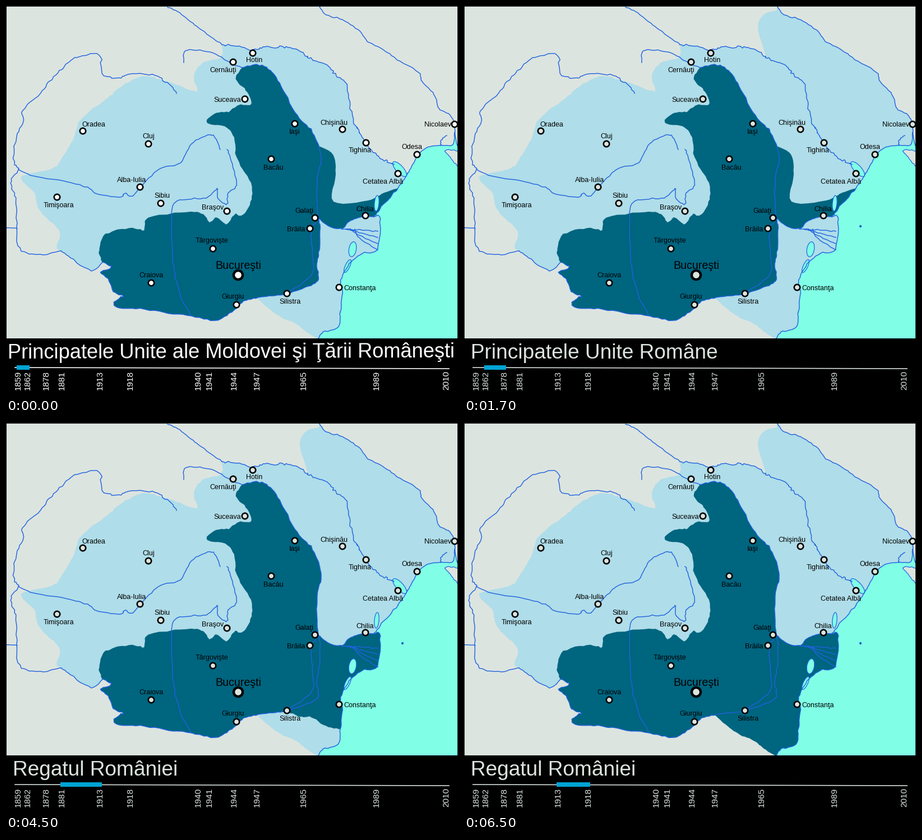
A matplotlib script that plays this animation: 806x694 px, repeating every 8 s.

```python
import numpy as np
import matplotlib.pyplot as plt
from matplotlib.animation import FuncAnimation
from matplotlib.patches import Circle, Ellipse, Polygon, Rectangle

W, H, DPI = 806, 694, 100
MAP_H = 594
PX = 72 / DPI
LAND, LIGHT, DARK = "#dce4df", "#afdde9", "#00657f"
SEA, RIVER, ACCENT = "#80ffe6", "#1f62df", "#00a3d3"

plt.rcParams["font.family"] = "Liberation Sans"
rng = np.random.default_rng(7)


def curve(*points, wobble=0.6, steps=6):
    """Catmull-Rom spline through the points with a small seeded meander."""
    p = np.array([points[0], *points, points[-1]], float)
    t = np.arange(steps)[:, None] / steps
    parts = [b + t / 2 * (c - a + t * (2 * a - 5 * b + 4 * c - d
                                       + t * (3 * (b - c) + d - a)))
             for a, b, c, d in zip(p, p[1:], p[2:], p[3:])]
    line = np.vstack([*parts, p[-1:]])
    line[1:-1] += rng.normal(0, wobble, line[1:-1].shape)
    return line


def back(line):
    return line[::-1]


# Rivers
dniester_up = curve((288, 2), (306, 10), (330, 28), (353, 46), (385, 69))
dniester_mid = curve((385, 69), (410, 71), (440, 79), (459, 73), (480, 74),
                     (500, 73), (520, 79), (538, 90), wobble=1)
dniester_low = curve((538, 90), (552, 99), (575, 107), (586, 122), (605, 136),
                     (612, 170), (620, 205), (630, 225), (641, 243),
                     (657, 264), (678, 277), (692, 283), wobble=1.2)
bug = curve((558, 0), (572, 16), (600, 25), (628, 42), (645, 63), (672, 77),
            (697, 95), (735, 118), (742, 135), (764, 158), (772, 183),
            (791, 194), (800, 211), (800, 225))
tisa = curve((304, 156), (284, 135), (262, 123), (218, 122), (200, 130),
             (172, 121), (165, 87), (121, 95), (96, 117), (77, 135),
             (62, 156), (30, 187), (31, 205), (18, 235), (14, 278), (22, 291),
             (10, 312), (17, 345), (19, 385), (24, 433), (60, 444), (98, 437),
             wobble=1.1)
mures = curve((22, 291), (50, 304), (100, 312), (145, 323), (160, 334),
              (200, 341), (213, 335), (225, 338), (255, 307), (275, 290),
              (311, 280), (328, 250), (350, 234), (370, 231), (382, 256))
olt = curve((394, 256), (404, 283), (411, 320), (396, 333), (394, 353),
            (378, 343), (376, 326), (357, 342), (325, 345), (297, 358),
            (297, 440), (299, 470), (311, 515), (330, 553))
prut_up = curve((317, 101), (318, 82), (340, 78), (375, 87), (400, 102), (421, 110))
prut_mid = curve((421, 110), (452, 105), (475, 119), (494, 150), (519, 196),
                 (543, 220), (558, 250))
prut_low = curve((558, 250), (562, 275), (556, 303), (554, 345), (557, 379))
chilia_arm = curve((557, 379), (578, 394), (600, 397), (612, 384), (632, 377),
                   (656, 376), wobble=0.4)
danube_east = curve((557, 379), (560, 395), (558, 440), (554, 460), (557, 488),
                    (540, 499), (501, 514))
danube_inner = curve((552, 386), (544, 400), (546, 440), (546, 478), (503, 511))
danube_mid = curve((501, 514), (475, 517), (447, 521), wobble=0.4)
danube_west = curve((447, 521), (424, 527), (403, 546), (372, 561), (330, 553),
                    (290, 548), (240, 540), (198, 538), (194, 527), (209, 517),
                    (194, 512), (182, 487), (169, 475), (187, 466), (172, 457))
banat_danube = curve((98, 437), (115, 449), (152, 472), (172, 457))
delta_arms = [curve((598 + 8 * k, 398), (630, 399 + 5 * k), (663, 402 + 11 * k))
              for k in range(4)]

# Coast, from the eastern edge to the southern one
gulf = curve((806, 251), (802, 240), (800, 225), (797, 247), (775, 249),
             (752, 252), (733, 266), wobble=0.3)
coast_north = curve((733, 266), (720, 293), (712, 306), (699, 325))
coast_mid = curve((699, 325), (670, 358), (656, 376))
coast_delta = curve((656, 376), (667, 379), (662, 435), (636, 441), (612, 460),
                    (597, 489), (600, 512), (596, 546))
coast_south = curve((596, 546), (592, 573), (565, 582), (556, MAP_H))
spit = curve((806, 259), (783, 257), (792, 270), (806, 286))

# Land borders
northwest = curve((385, 69), (382, 92), (350, 102), (335, 126), (340, 152),
                  (303, 140), (283, 133), (255, 126), (235, 128), (203, 145),
                  (182, 164), (150, 187), (130, 207), (120, 238), (97, 275),
                  (83, 290), (27, 305), (50, 333), (56, 357), (72, 378),
                  (95, 402), (91, 430), (98, 437))
carpathians = curve((172, 457), (166, 437), (178, 407), (220, 396), (246, 399),
                    (254, 378), (322, 367), (352, 372), (363, 386), (376, 377),
                    (393, 389), (407, 373), (422, 373), (436, 350), (437, 316),
                    (414, 278), (406, 235), (390, 215), (358, 209), (372, 192),
                    (397, 188), (415, 177), (437, 174), (428, 150), (410, 131),
                    (421, 110))
bessarabia_south = curve((558, 250), (583, 265), (588, 300), (584, 349),
                         (645, 347), (675, 333), (699, 325), wobble=0.2)
quadrilateral = curve((447, 521), (470, 541), (492, 556), (517, 567),
                      (535, 581), (556, MAP_H), wobble=0.3)
dobrogea_south = curve((596, 546), (570, 541), (545, 525), (524, 524), (501, 514))
east_bank = curve((558, 8), (538, 13), (526, 27), (525, 46), (533, 72), (538, 90),
                  wobble=0)

light_area = [northwest, banat_danube, back(danube_west), quadrilateral,
              back(coast_south), back(coast_delta), back(coast_mid),
              back(coast_north[8:]), back(dniester_low), back(dniester_mid)]
transnistria = [east_bank, dniester_low, back(coast_north), back(gulf), back(bug)]
heartland = [danube_west, carpathians, prut_mid]
with_delta = [*heartland, prut_low, chilia_arm, coast_delta]
dark_areas = [
    [*heartland, bessarabia_south, coast_mid, back(chilia_arm), danube_east, danube_mid],
    [*with_delta, dobrogea_south, danube_mid],
    [*with_delta, coast_south, back(quadrilateral)],
]
coast = [gulf, coast_north, coast_mid, coast_delta, coast_south]
rivers = [dniester_up, dniester_mid, dniester_low, bug, tisa, mures, olt,
          prut_up, prut_mid, prut_low, chilia_arm, danube_east, danube_inner,
          danube_mid, danube_west, banat_danube, *delta_arms, *coast,
          curve((0, 396), (20, 397)), curve((786, 231), (777, 238), (775, 249))]
# centre, width, height, angle
lagoons = [((702, 291), 34, 13, 48), ((661, 352), 8, 28, 5),
           ((618, 434), 13, 27, 10), ((609, 464), 8, 25, 25)]

# name, marker position, label offset
cities = [
    ("Hotin", 440, 84, 3, 12), ("Cernăuţi", 405, 100, -18, 14),
    ("Suceava", 426, 166, -31, 1), ("Oradea", 137, 223, 19, -12),
    ("Cluj", 254, 246, 0, -14), ("Iaşi", 515, 210, 0, 14),
    ("Chişinău", 600, 220, -15, -12), ("Tighina", 642, 244, -11, 13),
    ("Nicolaev", 800, 211, -30, 0), ("Odesa", 733, 265, -9, -14),
    ("Cetatea Albă", 699, 299, -27, 14), ("Bacău", 473, 273, 4, 15),
    ("Alba-Iulia", 239, 323, -15, -13), ("Sibiu", 276, 352, 2, -14),
    ("Timişoara", 91, 341, 3, 14), ("Braşov", 394, 366, -25, -7),
    ("Galaţi", 551, 378, -19, -13), ("Chilia", 641, 374, -1, -12),
    ("Brăila", 542, 397, -25, 1), ("Târgovişte", 369, 433, -2, -15),
    ("Bucureşti", 414, 480, 0, -18), ("Craiova", 259, 494, 0, -14),
    ("Giurgiu", 411, 533, -6, -15), ("Silistra", 501, 513, 6, 14),
    ("Constanţa", 594, 502, 37, 1),
]
years = {1859: 22, 1862: 39, 1878: 72, 1881: 100, 1913: 168, 1918: 222,
         1940: 343, 1941: 363, 1944: 407, 1947: 448, 1965: 531, 1989: 661,
         2010: 785}

UNION, KINGDOM = "Principatele Unite Române", "Regatul României"
# start ms, title, dark area, first and last year
stages = [
    (0, "Principatele Unite ale Moldovei şi Ţării Româneşti", 0, 1859, 1862),
    (500, UNION, 0, 1862, 1878),
    (2500, UNION, 1, 1878, 1881),
    (4500, KINGDOM, 1, 1881, 1913),
    (6500, KINGDOM, 2, 1913, 1918),
]

fig = plt.figure(figsize=(W / DPI, H / DPI), dpi=DPI, facecolor="black")
ax = fig.add_axes([0, 0, 1, 1])
ax.set(xlim=(0, W), ylim=(H, 0))
ax.axis("off")


def area(parts, color, z, edge="none"):
    return ax.add_patch(Polygon(np.vstack(parts), fc=color, ec=edge,
                                lw=1.2 * PX, zorder=z))


ax.add_patch(Rectangle((0, 0), W, MAP_H, fc=LAND, zorder=0))
area(light_area, LIGHT, 1)
east_patch = area(transnistria, LIGHT, 1)
dark_patches = [area(parts, DARK, 2) for parts in dark_areas]
area([*coast, [(W, MAP_H)]], SEA, 3)
area([spit], LAND, 3, RIVER)
for center, width, height, angle in lagoons:
    ax.add_patch(Ellipse(center, width, height, angle=angle, fc=SEA, ec=RIVER,
                         lw=1.2 * PX, zorder=3))
for line in rivers:
    ax.plot(*line.T, color=RIVER, lw=1.4 * PX, zorder=4)
island = ax.add_patch(Circle((707, 393), 1.6, fc=DARK, ec=RIVER, lw=PX, zorder=4))
ax.add_patch(Rectangle((0, MAP_H), W, H - MAP_H, fc="black", zorder=5))
ax.add_patch(Rectangle((0, 0), W, MAP_H, fc="none", ec="black", lw=2 * PX,
                       snap=False, zorder=5))

markers = []
for name, x, y, dx, dy in cities:
    radius, edge, size = (8, 4.4, 19.6) if name == "Bucureşti" else (5.2, 2.6, 12.5)
    markers.append(ax.add_patch(Circle((x, y), radius, ec="black", lw=edge * PX, zorder=6)))
    ax.text(x + dx, y + dy + 0.35 * size, name, size=size * PX, ha="center",
            va="baseline", zorder=7)

labels = [ax.text(x, 668, str(year), size=15.4 * PX, rotation=90,
                  ha="center", va="center", zorder=6) for year, x in years.items()]
axis_line, = ax.plot([16, 790], [645, 647], lw=1.6 * PX, zorder=6)
bar = ax.add_patch(Rectangle((0, 641), 1, 7.5, fc=ACCENT, zorder=7))
title = ax.text(0, 629, "", va="baseline", rotation_mode="anchor", zorder=6)

INTERVAL = 500


def draw(i):
    start, text, dark, since, until = [s for s in stages if s[0] <= i * INTERVAL][-1]
    first = start == 0
    ink = "white" if first else LAND
    for k, patch in enumerate(dark_patches):
        patch.set_visible(k == dark)
    for patch in (east_patch, island):
        patch.set_visible(not first)
    for marker in markers:
        marker.set_facecolor(ink)
    for line in (*labels, axis_line):
        line.set_color(ink)
    left, right = years[since] - 3, years[until] + 3
    bar.set(x=left, width=right - left)
    title.set(text=text, x=2.5 if first else 11.5, color=ink,
              size=(36.3 if first else 37) * PX, rotation=0.15 if first else 0)
    return []


anim = FuncAnimation(fig, draw, frames=16, interval=INTERVAL, repeat=True,
                     repeat_delay=0, blit=False)
plt.show()
```
